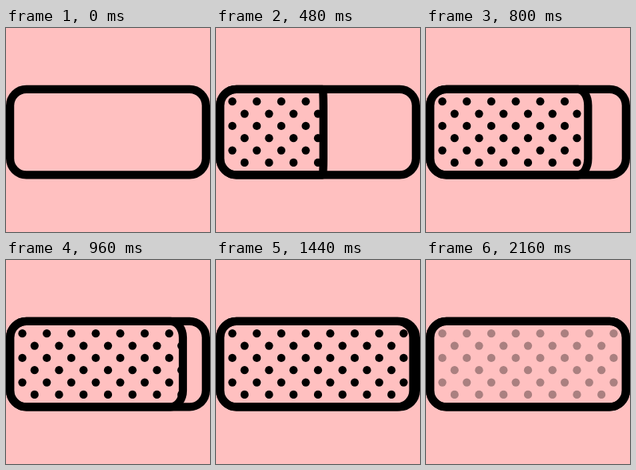
An HTML page that plays this animation: 256 px wide and 256 px high, repeating every 2.24 s.

```html
<!DOCTYPE html>
<html lang="en">
<head>
<meta charset="utf-8">
<title>Filling bar</title>
<style>
  html, body { margin: 0; width: 100%; height: 100%; overflow: hidden; background: #ffc0c0; }
  svg { display: block; width: 100vw; height: 100vh; }
</style>
</head>
<body>
<svg viewBox="0 0 25 25">
  <defs><clipPath id="clip"><path id="clipShape"/></clipPath></defs>
  <rect width="25" height="25" fill="#ffc0c0"/>
  <g id="dots" clip-path="url(#clip)"></g>
  <g fill="none" stroke="#000">
    <rect x=".5" y="7.5" width="24" height="10.5" rx="2"/>
    <path id="bar"/>
  </g>
</svg>
<script>
const LOOP = 2240, STEP = 80;
const FILL_START = 160, FILL_TIME = 1600;
const FADE_START = 2000, FADE_TIME = 240;
const KAPPA = 0.5523;
const byId = id => document.getElementById(id);
const clamp = v => Math.min(1, Math.max(0, v));

const dots = byId('dots');
for (let row = 0; row < 6; row++) {
  const odd = row % 2;
  for (let col = 0; col < 8 - odd; col++) {
    const dot = document.createElementNS('http://www.w3.org/2000/svg', 'circle');
    dot.setAttribute('cx', 2 + 3 * col + 1.5 * odd);
    dot.setAttribute('cy', 9 + 1.5 * row);
    dot.setAttribute('r', 0.5);
    dots.append(dot);
  }
}

const bezier = (a, b, s) => 3 * a * s * (1 - s) ** 2 + 3 * b * s * s * (1 - s) + s ** 3;

function easeOut(x) {
  if (x <= 0 || x >= 1) return clamp(x);
  let low = 0, high = 1;
  for (let i = 0; i < 30; i++) {
    const mid = (low + high) / 2;
    if (bezier(0.205, 0.35, mid) < x) low = mid; else high = mid;
  }
  return bezier(0.63, 1, low);
}

// The leading edge bends from the left border's curve to the right border's.
function barPath(p) {
  const x = 0.5 + 24 * p;
  const bend = 2 * (2 * p - 1);
  const start = x - bend, handle = start + bend * KAPPA, dy = 2 * KAPPA;
  return `M2.5 7.5H${start}C${handle} 7.5 ${x} ${9.5 - dy} ${x} 9.5V16` +
    `C${x} ${16 + dy} ${handle} 18 ${start} 18H2.5A2 2 0 0 1 .5 16V9.5A2 2 0 0 1 2.5 7.5Z`;
}

function draw(time) {
  const t = Math.floor((time % LOOP) / STEP) * STEP;
  const p = easeOut((t - FILL_START) / FILL_TIME);
  const path = barPath(p);
  byId('bar').setAttribute('d', path);
  byId('bar').setAttribute('visibility', p > 0 ? 'visible' : 'hidden');
  byId('clipShape').setAttribute('d', path);
  dots.setAttribute('opacity', p > 0 ? 1 - clamp((t - FADE_START) / FADE_TIME) : 0);
}

let origin;
function tick(now) {
  origin ??= now;
  draw(now - origin);
  requestAnimationFrame(tick);
}
draw(0);
requestAnimationFrame(tick);
</script>
</body>
</html>
```
